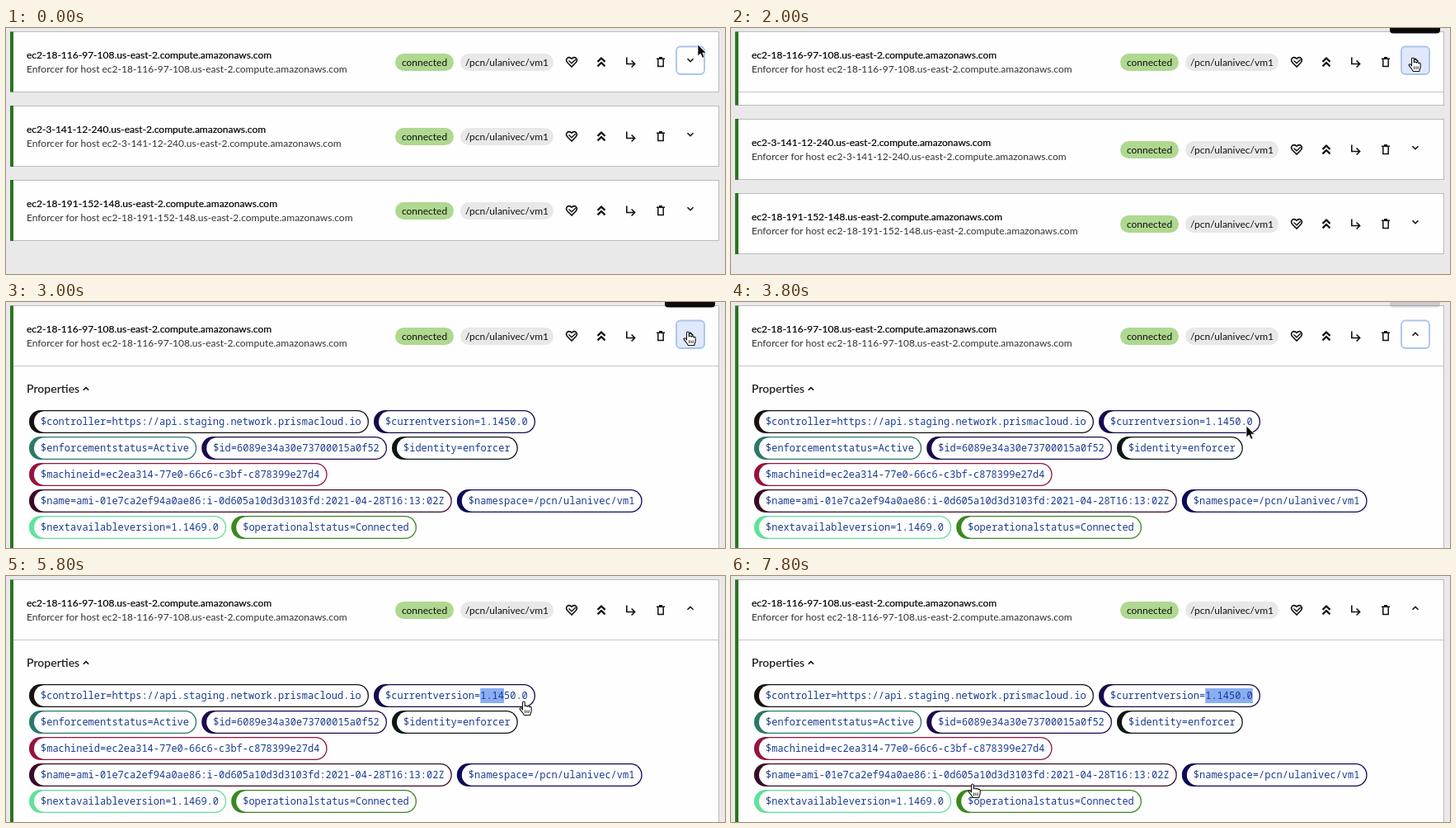
Write an HTML page that moves like this. It is 872 px wide and 298 px high and loops after 8000 ms.

```html
<!DOCTYPE html>
<html lang="en">
<head>
<meta charset="utf-8">
<title>Enforcer list</title>
<style>
html, body { margin: 0; width: 100%; height: 100%; overflow: hidden; background: #e9e9e9; }
svg { display: block; width: 872px; height: 298px; }
text { font: 12px Lato, sans-serif; fill: #333; }
.title { fill: #000; stroke: #000; stroke-width: .2px; }
.pill { fill: #111; }
.heading { font-size: 14px; font-weight: 600; fill: #222; }
.chip { font: 12px "Noto Sans Mono", monospace; fill: #1b3c8f; }
.box { fill: #fefefe; stroke: #b9bcc0; }
.icon { fill: none; stroke: #111; stroke-width: 1.6; }

.anim { animation: 8s step-end infinite; }
#panel { animation-name: panel; }
#others { animation-name: others; }
#details, #divider { animation-name: appear; }
#divider { animation-name: divide; }
#hover { animation-name: hover; }
#focus { animation-name: focus; }
#toggle { animation-name: flip; }
#tip { animation-name: tip; }
#selection { animation-name: select; }
#cursor { animation-name: move; }
#arrow { animation-name: arrow; }
#hand { animation-name: hand; }

@keyframes panel { 0% { height: 73px } 25% { height: 89px } 27.5%, 100% { height: 400px } }
@keyframes others {
  0% { transform: none; visibility: visible }
  25% { transform: translateY(16px); visibility: visible }
  27.5%, 100% { transform: translateY(16px); visibility: hidden }
}
@keyframes appear { 0% { visibility: hidden } 27.5%, 100% { visibility: visible } }
@keyframes divide { 0% { visibility: hidden } 25%, 100% { visibility: visible } }
@keyframes hover { 0% { visibility: hidden } 5% { visibility: visible } 42.5%, 100% { visibility: hidden } }
@keyframes focus {
  0% { visibility: visible } 22.5% { visibility: hidden }
  25% { visibility: visible } 65%, 100% { visibility: hidden }
}
@keyframes flip { 0% { transform: none } 25%, 100% { transform: scale(1, -1) } }
@keyframes tip {
  0% { opacity: 0; x: 802px; width: 55px }
  15% { opacity: 1; x: 802px; width: 55px }
  25% { opacity: 1; x: 799px; width: 61px }
  45% { opacity: .6; x: 799px; width: 61px }
  47.5% { opacity: .13; x: 799px; width: 61px }
  50%, 100% { opacity: 0; x: 799px; width: 61px }
}
@keyframes select {
  0% { width: 0 } 70% { width: 14.4px } 72.5% { width: 28.8px } 75%, 100% { width: 57.6px }
}
@keyframes move {
  0% { transform: translate(839px, 20px); animation-timing-function: steps(6) }
  15% { transform: translate(828px, 37px) }
  17.5% { transform: translate(827px, 36px) }
  40% { transform: translate(827px, 36px); animation-timing-function: steps(3) }
  47.5% { transform: translate(625px, 150px); animation-timing-function: steps(2) }
  52.5% { transform: translate(580px, 148px) }
  65% { transform: translate(576px, 147px); animation-timing-function: steps(3) }
  72.5% { transform: translate(628px, 152px) }
  75% { transform: translate(636px, 152px) }
  85% { transform: translate(636px, 152px); animation-timing-function: steps(5) }
  97.5%, 100% { transform: translate(293px, 252px) }
}
@keyframes arrow {
  0% { visibility: visible } 5% { visibility: hidden }
  42.5% { visibility: visible } 50%, 100% { visibility: hidden }
}
@keyframes hand {
  0% { visibility: hidden } 5% { visibility: visible }
  42.5% { visibility: hidden } 50%, 100% { visibility: visible }
}
</style>
</head>
<body>
<svg id="stage" viewBox="0 0 872 298"></svg>
<script>
const CHAR = 7.2;
const chevron = '<path class="icon" d="M-3.5-1.8L0 1.7 3.5-1.8"/>';

const row = (host, toggle) => `
  <text class="title" x="25" y="37">${host}</text>
  <text x="25" y="54">Enforcer for host ${host}</text>
  <rect x="472" y="31" width="71" height="21" rx="10.5" fill="#afd890"/>
  <text class="pill" x="507.5" y="46" text-anchor="middle">connected</text>
  <rect x="551" y="31" width="113" height="21" rx="10.5" fill="#e8e8e8"/>
  <text class="pill" x="607.5" y="46" text-anchor="middle">/pcn/ulanivec/vm1</text>
  <g class="icon">
    <path d="M686 47L681 42C677.5 38 682 33 686 37.3 690 33 694.5 38 691 42Z"/>
    <path d="M682.5 39.5L686 42.8 691 38" stroke-width="1.3"/>
    <path d="M717.5 40.8l4.5-4.3 4.5 4.3M717.5 46.3l4.5-4.3 4.5 4.3" stroke-width="2.3"/>
    <path d="M752.8 35.5V43.5H762M758.6 39.5l4 4-4 4"/>
    <path d="M789 37.2H799M792 35.7h4M790.8 38V46.4H797.2V38" stroke-width="1.5"/>
  </g>
  <g transform="translate(830 39)">${toggle}</g>`;

const card = (y, host) => `<g transform="translate(0 ${y})">
  <rect class="box" x="5.5" y="4.5" width="859" height="73"/>
  <rect x="5" y="4" width="4" height="74" fill="#2b7420"/>
  ${row(host, chevron)}</g>`;

const chipRows = [
  [['$controller=https://api.staging.network.prismacloud.io', '#17110f'], ['$currentversion=1.1450.0', '#150a4c']],
  [['$enforcementstatus=Active', '#2b796c'], ['$id=6089e34a30e73700015a0f52', '#1c0a50'], ['$identity=enforcer', '#0b1714']],
  [['$machineid=ec2ea314-77e0-66c6-c3bf-c878399e27d4', '#97133d']],
  [['$name=ami-01e7ca2ef94a0ae86:i-0d605a10d3d3103fd:2021-04-28T16:13:02Z', '#390b26'], ['$namespace=/pcn/ulanivec/vm1', '#0d0b58']],
  [['$nextavailableversion=1.1469.0', '#60e29a'], ['$operationalstatus=Connected', '#39891f']]
];

function chips() {
  let shapes = '', labels = '';
  chipRows.forEach((items, i) => {
    let x = 28;
    const y = 131 + 32 * i;
    for (const [label, color] of items) {
      const w = label.length * CHAR + 23.2;
      shapes += `<rect x="${x}" y="${y}" width="${w}" height="28" rx="14" fill="${color}"/>
        <rect x="${x + 6}" y="${y + 1.3}" width="${w - 7.3}" height="25.4" rx="12.7" fill="#fefefe"/>`;
      labels += `<text class="chip" x="${x + 14}" y="${y + 18}">${label}</text>`;
      x += w + 6;
    }
  });
  return shapes +
    '<rect id="selection" class="anim" x="575.2" y="136" height="18" fill="#8aaef3"/>' + labels;
}

document.getElementById('stage').innerHTML = `
  <rect width="872" height="298" fill="#e9e9e9"/>
  <g id="others" class="anim">
    ${card(90, 'ec2-3-141-12-240.us-east-2.compute.amazonaws.com')}
    ${card(180, 'ec2-18-191-152-148.us-east-2.compute.amazonaws.com')}
  </g>
  <rect id="panel" class="box anim" x="5.5" y="4.5" width="859"/>
  <rect id="panel" class="anim" x="5" y="4.5" width="4" fill="#2b7420"/>
  <path id="divider" class="anim" d="M9 77.5H864" stroke="#c3c5c8"/>
  <rect id="hover" class="anim" x="812.5" y="22" width="35" height="34" rx="5" fill="#e0e9fb"/>
  <rect id="focus" class="anim" x="813" y="22.5" width="34" height="33.5" rx="5" fill="none" stroke="#abc3ec" stroke-width="1.8"/>
  ${row('ec2-18-116-97-108.us-east-2.compute.amazonaws.com', `<g id="toggle" class="anim">${chevron}</g>`)}
  <g id="details" class="anim">
    <text class="heading" x="25" y="110">Properties</text>
    <path class="icon" d="M93.8 106.8l3.2-3.2 3.2 3.2" stroke-width="1.3"/>
    ${chips()}
  </g>
  <rect id="tip" class="anim" y="-20" height="26.5" rx="4" fill="#0b0b0b"/>
  <g id="cursor" class="anim">
    <path id="arrow" class="anim" d="M0 0V14L3.3 11 5.6 16.2 8 15.2 5.8 10.2H10.2Z" fill="#0a0a0a" stroke="#fff" stroke-width=".7"/>
    <g id="hand" class="anim" fill="#fff" stroke="#111" stroke-width="1.1" stroke-linejoin="round">
      <path d="M-1.5 10V1.4C-1.5-.4 1.3-.4 1.3 1.4V6C1.6 4.7 3.9 4.7 4.1 6.2 4.5 5.2 6.6 5.3 6.8 6.8 7.3 6 9.2 6.2 9.2 7.8V11C9.2 13 8 14 7.8 16.5H.2C-.3 14-3 12-4.6 9.6-5.5 8.2-3.7 7.2-2.7 8.2Z"/>
      <path d="M1.6 10.5V14M3.9 10.5V14M6.2 10.5V14" fill="none" stroke-width=".9"/>
    </g>
  </g>`;
</script>
</body>
</html>
```
